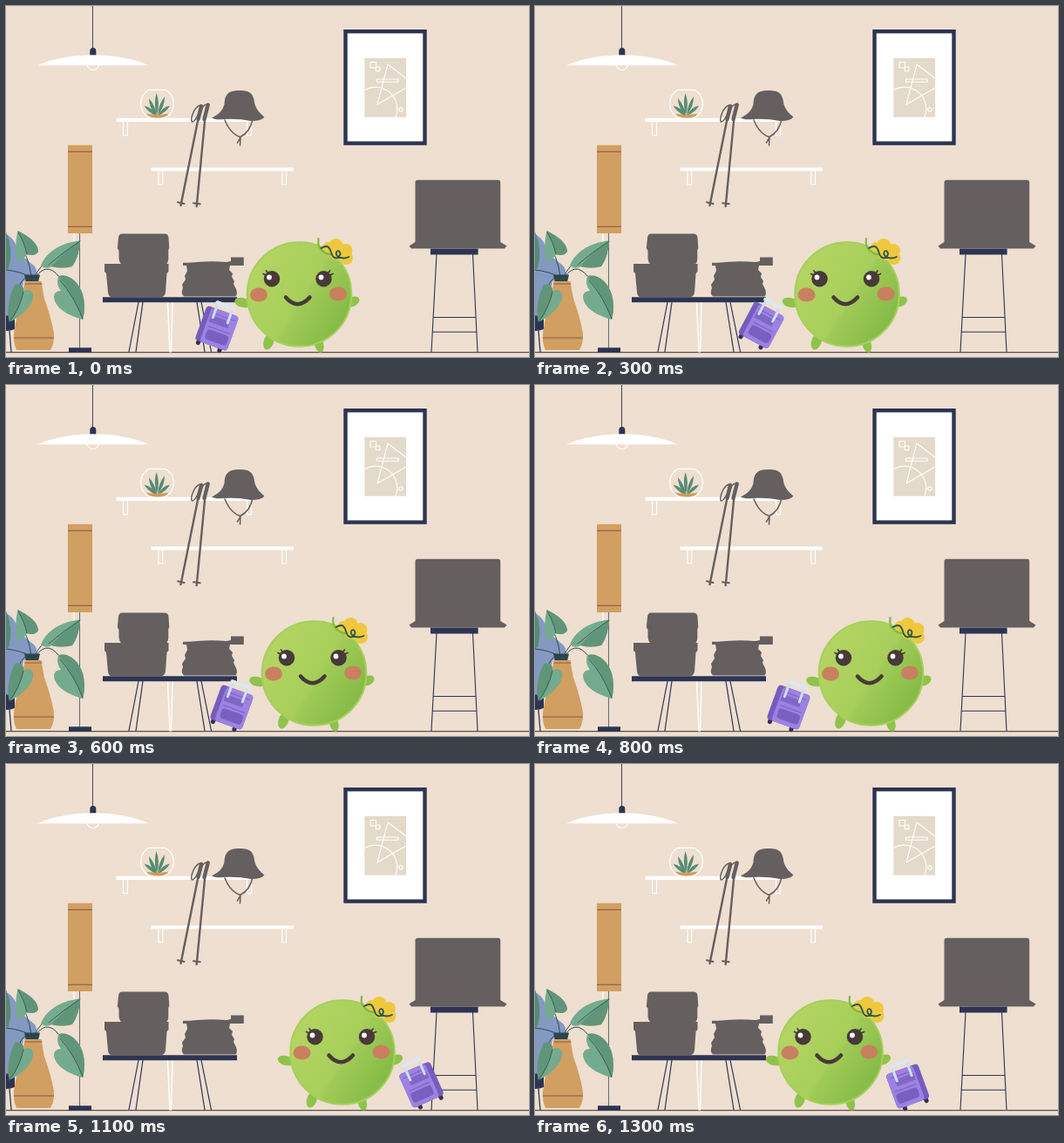
Recreate the animation shown at these times as an HTML page. Size 600 by 403 pixels, loop 1.4 s.

```html
<!DOCTYPE html>
<html lang="en">
<head>
<meta charset="utf-8">
<title>Packing room</title>
<style>
  html, body { margin: 0; width: 100%; height: 100%; overflow: hidden; background: #eedfd0; }
  svg { display: block; width: 100%; height: 100%; }
</style>
</head>
<body>
<svg viewBox="0 0 600 403" fill="none" stroke-linecap="round" stroke-linejoin="round">
  <defs>
    <linearGradient id="skin" x1="0.08" y1="0.25" x2="0.95" y2="0.8">
      <stop offset="0" stop-color="#b3d462"/>
      <stop offset="0.5" stop-color="#a8cf5b"/>
      <stop offset="0.55" stop-color="#a0ca57"/>
      <stop offset="1" stop-color="#82b945"/>
    </linearGradient>
  </defs>
  <rect width="600" height="403" fill="#eedfd0"/>

  <!-- ceiling lamp -->
  <path d="M99.5 0V50" stroke="#4d4f5e" stroke-width="1.1"/>
  <circle cx="99.8" cy="66.5" r="7" stroke="#fff" stroke-width="1.2"/>
  <path d="M96.3 57V51.5a3.5 3.5 0 0 1 7 0V57Z" fill="#2d3453"/>
  <path d="M36 68.2C55 60 78 56.3 100 56.3S145 60 164 68.2Z" fill="#fff"/>

  <!-- picture -->
  <rect x="389.5" y="29.2" width="91" height="128.4" fill="#fff" stroke="#2d3453" stroke-width="4.4" stroke-linejoin="miter"/>
  <rect x="411.3" y="59.8" width="47.8" height="67.8" fill="#e4dac9"/>
  <g stroke="#fff" stroke-width="1.1">
    <path d="M418 64.5h6.5v6.5H418ZM424.3 70h4.6v4.6h-4.6ZM425.5 84h24.5v3.2H425.5Z"/>
    <path d="M459 83 438 67 426 113 459 94M411.5 96.4A25 25 0 0 1 447 127.5"/>
    <circle cx="453" cy="119" r="2.2"/>
  </g>

  <!-- shelves -->
  <path d="M126.5 128.8H282V133H126.5ZM166.5 185.6H330V189.6H166.5Z" fill="#fff"/>
  <path d="M134.5 133v15.7h5V133M276.5 133v15.7h5V133M175 190v15h4.7V190M316.8 190v15h4.7V190" stroke="#fff" stroke-width="1.2"/>

  <!-- terrarium -->
  <path d="M164 96.3H183A18.2 18.2 0 0 1 184 127.5Q181 129 173.5 129T163 127.5A18.2 18.2 0 0 1 164 96.3Z" stroke="#fff" stroke-width="1.3"/>
  <g fill="#568c72">
    <path d="M173 125Q169 112 172.500 100Q177 112 173 125Z"/>
    <path d="M172 125Q164 117 164 106Q171 114 173 125Z"/>
    <path d="M174 125Q175 113 182 104Q182 116 174 125Z"/>
    <path d="M172 126Q163 122 158.500 114.500Q168 117 173 125Z"/>
    <path d="M174 126Q179 116 188 114.500Q184 122 174 126Z"/>
  </g>
  <path d="M161 123.500Q173 126 186.500 123.500Q184 128.500 174 128.500T161 123.500Z" fill="#d19a57"/>

  <!-- trekking poles -->
  <g stroke="#65605f">
    <path d="M222 122 200.500 229M229 122 218.700 230" stroke-width="2.4"/>
    <path d="M224 115 220.500 130M231.700 113.500 227.500 130" stroke-width="4.4"/>
    <path d="M223 114C216 115 211 130 213.500 133Q217 133 222 121M231 113Q225 113 224 122" stroke-width="1.5"/>
    <path d="M197 225.300 204.500 227M215 226.300 222.700 227.300" stroke-width="2"/>
  </g>

  <!-- hat -->
  <path d="M251 131Q257 146 268.500 150.500Q280 145 283 130M269 151 265.500 157M269 151 268.500 160" stroke="#65605f" stroke-width="1.5"/>
  <path d="M236 128.500Q248 123 250.500 113C251 101 255 97 268 97S284 101 285.500 113Q288 121 296.500 127.500Q293 132 281 132Q266 129 250 130Q240 131 236 128.500Z" fill="#65605f"/>

  <!-- floor -->
  <path d="M0 397.600H600" stroke="#57504f" stroke-width="1.1"/>

  <!-- floor lamp -->
  <path d="M78 261V292" stroke="#fff" stroke-width="1.2"/>
  <path d="M84.500 261V393" stroke="#6b7174" stroke-width="1.1"/>
  <path d="M71 159.800H99V261H71Z" fill="#d19f62"/>
  <path d="M71.500 167.300H98.500M71.500 253.300H98.500" stroke="#875640" stroke-width="1.1"/>
  <path d="M72 392.300H98V398H72Z" fill="#2d3453"/>

  <!-- blue chair -->
  <path d="M0 262Q10 266 15 284L33 299Q38 307 32 313L20 316Q17 340 10 357H0Z" fill="#8499c2"/>
  <path d="M0 355.500H10V371Q6 373 0 373Z" fill="#2d3453"/>
  <path d="M4 373 6 397" stroke="#2d3453" stroke-width="1.3"/>

  <!-- potted plant -->
  <path d="M29 311Q26 286 14 272M33 311Q38 299 50 291M34 311Q49 290 65 317M27 311Q18 305 0 303M26 311Q16 312 13 330" stroke="#2c4b4a"/>
  <path d="M21 308.500H39L37 317H23Z" fill="#2b454e"/>
  <path d="M21.500 316H40.500Q42 326 44 336Q52 358 55 376Q55.500 388 51 395H12Q8 386 9 376Q12 354 18.500 336Z" fill="#d19f62"/>
  <path d="M22 319H41M9.500 381H54.700" stroke="#935a3e" stroke-width="1.1"/>
  <path d="M0 259Q9 280 3 301L0 303Z" fill="#568c72"/>
  <g fill="#74ab8e">
    <path d="M13.500 258C23 263 37 271 37 282Q33 288 24 285Q20 292 13 294Q9 277 13.500 258Z"/>
    <path d="M85 269.500C67 271 47 280 40 298Q45 303 53 299Q63 302 76 299Q84 288 85 269.500Z"/>
    <path d="M60 310C71 307 83 315 88 331Q92 346 88 360C73 356 55 347 55 333Q56 327 63 327Q57 320 60 310Z"/>
    <path d="M10 320C18 318 21 324 20 328Q28 323 31 331C33 343 17 357 4 363Q-1 343 10 320Z"/>
  </g>
  <g fill="#61957a">
    <path d="M13.500 258C23 263 37 271 37 282Q33 288 24 285Q21 271 13.500 258Z"/>
    <path d="M85 269.500Q65 283 52 299Q63 302 76 299Q84 288 85 269.500Z"/>
    <path d="M60 310C71 307 83 315 88 331Q92 346 88 360Q78 333 60 310Z"/>
    <path d="M10 320C18 318 21 324 20 328Q16 349 4 363Q-1 343 10 320Z"/>
  </g>
  <path d="M14 260Q21 271 24 285M85 270Q65 283 49 297M62 315Q78 333 88 359M20 328Q16 347 4 363" stroke="#35564f" stroke-width="0.9"/>

  <!-- table -->
  <path d="M185.500 340 188 397M191 340 189.500 397" stroke="#fff" stroke-width="1.5"/>
  <path d="M152 340 141 397M157 340 149 397M219 340 228 397M224 340 235.500 397" stroke="#2d3453" stroke-width="1.2"/>
  <path d="M111 334.300H265V340.300H111Z" fill="#2d3453"/>

  <!-- packed things -->
  <g fill="#65605f">
    <path d="M133 261.500H182Q186 261.500 186.500 266L187.300 278 186.300 280V291Q185.500 296 183.500 296H186.500V305L184.500 307 183 329Q182 334.300 177 334.300H122Q117.500 334.300 117 329L115 307 113 305V296H132Q130 294 129.500 290V281L127.800 278 129 266Q129.500 261.500 133 261.500Z"/>
    <path d="M203 294.800H210Q232 292 253 294L258 293V288.500H272.800V298H257L256 303 260 307 259 311 262 316 261 319 264 325Q266 330 263.500 333.500H204Q200 330 203 324L202 320 206 314 205 310 208 304 207 298H203Z"/>
  </g>

  <!-- stool and laptop -->
  <path d="M494 285 488 397M535.500 285 541 397M490.300 357.500H539M489.400 374.300H540" stroke="#2d3453" stroke-width="1.1"/>
  <path d="M487 278.500H541.600V285.500H487Z" fill="#2d3453"/>
  <path d="M472.500 199.800H564.500Q567.200 199.800 567.200 202.500V271L574.500 275.500 572 278.600H465L462.500 275.500 469.500 271V202.500Q469.500 199.800 472.500 199.800Z" fill="#65605f"/>

  <!-- traveller; origin is the centre of the body -->
  <g id="traveller">
    <g id="case">
      <g transform="translate(-96 38.500) rotate(20)">
        <path d="M-13 20v3M13 20v3" stroke="#39304f" stroke-width="5"/>
        <rect x="-18" y="-21" width="39" height="42" rx="4" fill="#765dbd"/>
        <rect x="-12" y="-21" width="33" height="42" rx="4" fill="#9c82e2"/>
        <path d="M-9 -15H17M-8 1H17" stroke="#8569cd" stroke-width="1.5"/>
        <path d="M-10 -12H13V-4H-10Z" fill="#8067c6"/>
        <rect x="-8" y="4" width="26" height="12" rx="3.500" fill="#795fc0"/>
        <path d="M-7 -10V-28H11V-10" stroke="#cfdef0" stroke-width="3"/>
        <path d="M-8 -28H12" stroke="#dbe8ee" stroke-width="4.500"/>
      </g>
    </g>
    <g fill="#8fc34c">
      <ellipse cx="-65" cy="9.500" rx="9.500" ry="5.500" transform="rotate(14 -65 9.500)"/>
      <ellipse cx="61" cy="8.500" rx="8.500" ry="5.500" transform="rotate(-24 61 8.500)"/>
      <ellipse cx="-35" cy="54" rx="5.700" ry="10" transform="rotate(20 -35 54)"/>
      <ellipse cx="22.500" cy="57" rx="5.200" ry="10" transform="rotate(-15 22.500 57)"/>
    </g>
    <circle r="59.800" fill="url(#skin)" stroke="#a7cf5c" stroke-width="2"/>
    <g fill="#c9805f">
      <ellipse cx="-46.500" cy="0.500" rx="10" ry="8"/>
      <ellipse cx="44.500" cy="-0.500" rx="10" ry="8"/>
    </g>
    <g fill="#473a38">
      <circle cx="-31.500" cy="-17.800" r="9.200"/>
      <circle cx="28" cy="-17.800" r="9.200"/>
    </g>
    <path d="M-38 -22 -41.500 -23.500M-36 -24.500 -38 -27M35 -22 38.500 -23.500M33 -24.500 35 -27" stroke="#473a38" stroke-width="1.700"/>
    <g fill="#fff">
      <circle cx="-34.500" cy="-19.500" r="2.900"/>
      <circle cx="25" cy="-19.500" r="2.900"/>
    </g>
    <path d="M-15.500 3.500Q-2 19 12 3.500" stroke="#473a38" stroke-width="4.500"/>
    <g fill="#efc83e">
      <circle cx="33" cy="-54" r="6"/>
      <circle cx="42" cy="-56" r="8"/>
      <circle cx="53" cy="-50" r="8"/>
      <circle cx="54" cy="-41.500" r="7.500"/>
      <circle cx="43" cy="-47" r="8"/>
    </g>
    <path d="M22 -64Q20 -53 29 -48Q33 -45.500 37 -46" stroke="#83b943" stroke-width="2.200"/>
    <path d="M25 -53C37 -60 35 -47 39 -43C43 -39 49 -45 46 -49C43 -52 40 -46 45 -43Q51 -40 57 -43" stroke="#24594c" stroke-width="1.800"/>
  </g>
</svg>
<script>
  const LOOP = 1400;
  const STEP = 100;
  const HAND = "-70 10";
  // time, body x, extra tilt of the case, side it is held on
  const POSES = [
    [0, 336.5, 0, 1], [200, 347, 4, 1], [300, 358, 8, 1], [400, 362, 5, 1],
    [500, 358, 2, 1], [600, 353.5, 0, 1], [700, 369.5, 0, 1], [800, 385.5, 0, 1],
    [1000, 403, 0, 1], [1100, 386, 4, -1], [1200, 362.5, 8, -1], [1300, 339, 0, -1]
  ];
  const traveller = document.getElementById("traveller");
  const suitcase = document.getElementById("case");

  function draw(ms) {
    const time = Math.floor((ms % LOOP) / STEP) * STEP;
    const [, x, tilt, side] = POSES.findLast(pose => pose[0] <= time);
    const swap = side < 0 ? "translate(-6 0) scale(-1 1) " : "";
    traveller.setAttribute("transform", `translate(${x} 331)`);
    suitcase.setAttribute("transform", `${swap}rotate(${tilt} ${HAND})`);
  }

  let start;
  function tick(now) {
    start ??= now;
    draw(now - start);
    requestAnimationFrame(tick);
  }
  draw(0);
  requestAnimationFrame(tick);
</script>
</body>
</html>
```
